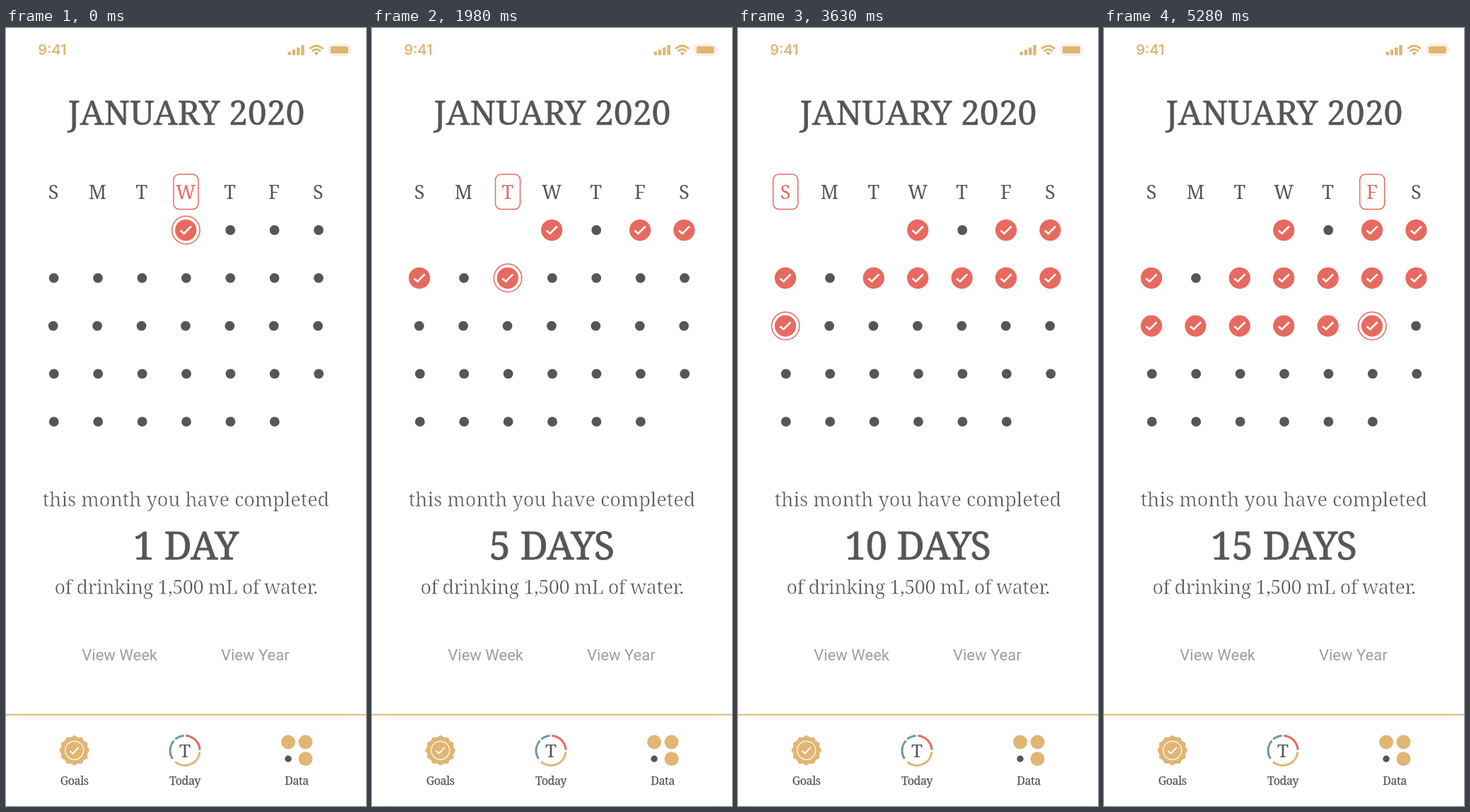
An HTML page for the animation above (5.61 s loop, 509 by 1101 pixels).

```html
<!DOCTYPE html>
<html lang="en">
<head>
<meta charset="utf-8">
<title>Monthly water tracker</title>
<style>
  html, body { margin: 0; width: 100%; height: 100%; overflow: hidden; background: #fff; }
  svg { display: block; width: 100%; height: 100%; }
  text { text-anchor: middle; fill: #565658; font-family: "Noto Serif", serif; }
  .title { font-size: 48px; stroke: #565658; stroke-width: .5; }
  .weekday { font-size: 27px; }
  /* a white edge thins the regular weight to a light one */
  .copy { font-size: 27px; stroke: #fff; stroke-width: .6; }
  .count { font-size: 54px; letter-spacing: -.3px; stroke: #565658; stroke-width: .8; }
  .link { font: 22px Roboto, sans-serif; fill: #9e9e9e; }
  .tab { font-size: 16px; letter-spacing: -.4px; stroke: #565658; stroke-width: .25; }
  .clock { font: 600 20px Inter, sans-serif; }
  .gold { fill: #e1b574; }
  .dark { fill: #565658; }
  .red { fill: #e76a60; }
  .line { fill: none; stroke: #e76a60; stroke-width: 1.5; }
  .tick { fill: none; stroke: #fff; stroke-width: 2.7; }
  .arc { fill: none; stroke-width: 3; }
</style>
</head>
<body>
<svg viewBox="0 0 509 1101">
  <text class="clock gold" x="65.3" y="38">9:41</text>
  <g id="signal" class="gold"></g>
  <g fill="none" stroke="#e1b574" stroke-width="2.9">
    <path d="M429.2 29.4Q438.7 20.9 448.2 29.4M432.6 33Q438.7 27.6 444.8 33"/>
    <path class="gold" stroke="none" d="M435.2 35.2Q438.7 32.2 442.2 35.2L438.7 38.7Z"/>
  </g>
  <rect x="456.7" y="23.7" width="29.2" height="14.6" rx="4" fill="none" stroke="#e1b574" opacity=".45"/>
  <rect class="gold" x="458.7" y="25.7" width="25.2" height="10.6" rx="2.2"/>
  <path class="gold" opacity=".5" d="M487.3 28.6q3.4 2.4 0 4.8z"/>

  <text class="title" x="255" y="137">JANUARY 2020</text>
  <g id="calendar"></g>
  <rect id="frame" class="line" y="207" width="35" height="49.5" rx="8"/>
  <circle id="ring" class="line" r="19.7"/>

  <text class="copy" x="254.5" y="677">this month you have completed</text>
  <text id="count" class="count" x="254.3" y="752"></text>
  <text class="copy" x="254.5" y="801" letter-spacing="-.45">of drinking 1,500 mL of water.</text>
  <text class="link" x="160.7" y="894.5">View Week</text>
  <text class="link" x="352.3" y="894.5">View Year</text>

  <rect class="gold" y="970.8" width="509" height="2"/>
  <g transform="translate(96.7 1022.3)">
    <path id="badge" class="gold" stroke="#e1b574" stroke-width="2" stroke-linejoin="round"/>
    <circle r="13" fill="none" stroke="#fff" stroke-width="1.3"/>
    <path class="tick" style="stroke-width:2" d="M-6.2 .8L-2.1 4.4L6.2-4.4"/>
  </g>
  <g id="today" transform="translate(253 1022.5)"></g>
  <text x="253" y="1032" font-size="26">T</text>
  <g class="gold">
    <circle cx="399" cy="1010.5" r="10"/>
    <circle cx="423.5" cy="1010.5" r="10"/>
    <circle cx="423.5" cy="1034.3" r="10"/>
    <circle class="dark" cx="399" cy="1034.3" r="4.7"/>
  </g>
  <text class="tab" x="96.7" y="1071">Goals</text>
  <text class="tab" x="253" y="1071">Today</text>
  <text class="tab" x="411" y="1071">Data</text>
</svg>
<script>
const STEP = 330, STEPS = 17, DAYS = 31, FIRST_COL = 3;
const MISSED = [2, 6];
const ROW_SHIFT = [.6, .6, -.3, .8, .8];

const $ = id => document.getElementById(id);
const colX = c => 67 + 62.4 * c;
const rowY = r => 286 + 67.8 * r;

function add(parent, tag, attrs, text = "") {
  const el = document.createElementNS("http://www.w3.org/2000/svg", tag);
  for (const k in attrs) el.setAttribute(k, attrs[k]);
  el.textContent = text;
  return parent.appendChild(el);
}

function polar(r, deg) {
  const a = (deg - 90) * Math.PI / 180;
  return `${(r * Math.cos(a)).toFixed(2)} ${(r * Math.sin(a)).toFixed(2)}`;
}

function arc(color, from, to) {
  add($("today"), "path", {
    class: "arc", stroke: color,
    d: `M${polar(21, from)}A21 21 0 0 1 ${polar(21, to)}`
  });
}

[5, 8, 11, 14.5].forEach((h, i) =>
  add($("signal"), "rect", { x: 398.4 + 6.3 * i, y: 38.5 - h, width: 4.5, height: h, rx: 1.2 }));

$("badge").setAttribute("d", "M" + Array.from({ length: 24 }, (_, i) =>
  polar(i % 2 ? 18 : 20.4, i * 15)).join("L") + "Z");

arc("#e76a60", 3, 88);
arc("#e1b574", 95, 221);
arc("#6f9a9b", 236, 312);
arc("#6f9a9b", 319, 356);

const calendar = $("calendar");
const heads = [..."SMTWTFS"].map((s, c) =>
  add(calendar, "text", { class: "weekday", x: colX(c), y: 242 }, s));

const days = Array.from({ length: DAYS }, (_, i) => {
  const col = (i + FIRST_COL) % 7, row = Math.floor((i + FIRST_COL) / 7);
  const x = colX(col), y = rowY(row);
  const dot = add(calendar, "circle", { class: "dark", cx: x + ROW_SHIFT[row], cy: y, r: 6.9 });
  const done = add(calendar, "g", { transform: `translate(${x} ${y})` });
  add(done, "circle", { class: "red", r: 15.1 });
  add(done, "path", { class: "tick", d: "M-7.6 .6L-2.6 4.9L7.6-5.4" });
  return { col, x, y, dot, done, missed: MISSED.includes(i + 1) };
});

function draw(time) {
  const today = Math.floor(time / STEP) % STEPS;
  let total = 0;
  days.forEach((d, i) => {
    const done = i <= today && !d.missed;
    total += done;
    d.dot.style.display = done ? "none" : "";
    d.done.style.display = done ? "" : "none";
  });
  const { col, x, y } = days[today];
  heads.forEach((h, c) => h.classList.toggle("red", c === col));
  $("frame").setAttribute("x", x - 17.3);
  $("ring").setAttribute("cx", x + .2);
  $("ring").setAttribute("cy", y);
  $("count").textContent = `${total} DAY${total > 1 ? "S" : ""}`;
}

const start = performance.now();
function tick() {
  draw(performance.now() - start);
  requestAnimationFrame(tick);
}
tick();
</script>
</body>
</html>
```
